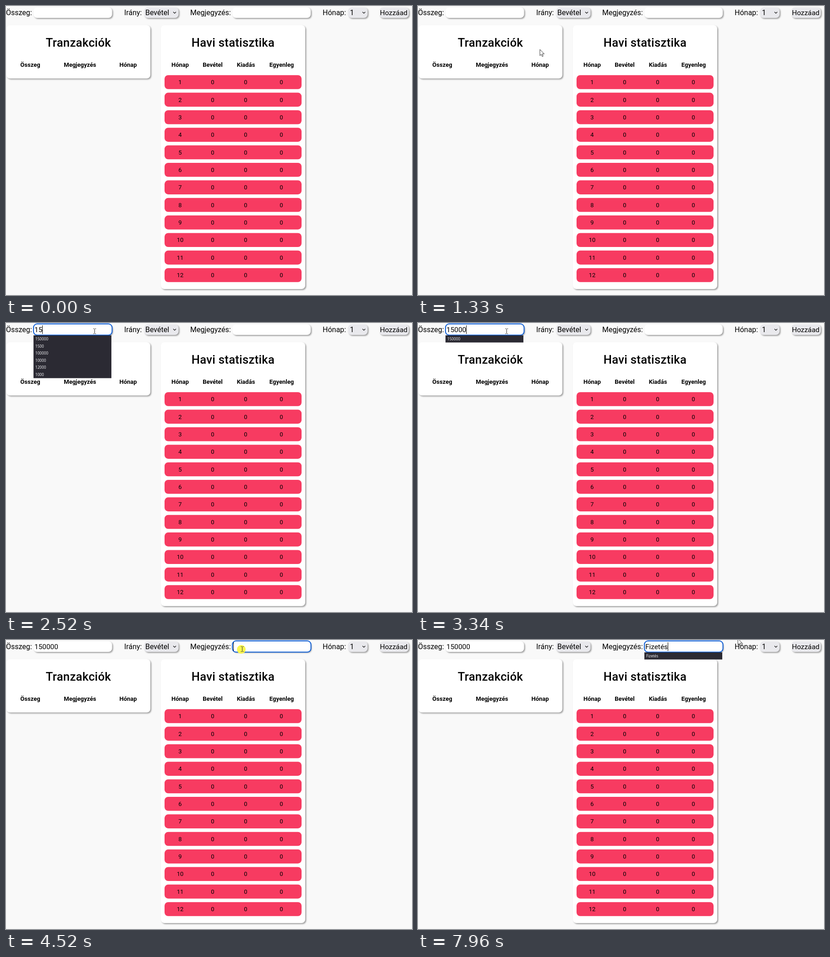
An HTML page that plays this animation: 886x632 px, repeating every 8 s.

```html
<!DOCTYPE html>
<html lang="hu">
<head>
<meta charset="utf-8">
<title>Tranzakciók</title>
<style>
  html, body { margin: 0; width: 100%; height: 100%; overflow: hidden; background: #f9f9f9; }
  svg { display: block; width: 886px; height: 632px; }
  text { font: 16px Roboto, sans-serif; white-space: pre; }
  .mid { text-anchor: middle; }
  .title { font-size: 25.6px; font-weight: 500; letter-spacing: .3px; }
  .head { font-size: 13px; font-weight: 700; }
  .cell { font-size: 13px; }
  .field { font-size: 15.36px; }
  .hint { font: 8.2px "Open Sans", sans-serif; fill: #fbfbfe; }
  .raised { filter: drop-shadow(2px 2px 1.5px #999); }
</style>
</head>
<body>
<svg id="stage" viewBox="0 0 886 632"></svg>
<script>
const LOOP = 8000, ROW = 15.6;
const stage = document.getElementById('stage');

function add(tag, attrs, text = '') {
  const el = document.createElementNS('http://www.w3.org/2000/svg', tag);
  for (const k in attrs) el.setAttribute(k, attrs[k]);
  el.textContent = text;
  stage.append(el);
  return el;
}
const box = (x, y, width, height, fill, cls = 'raised') =>
  add('rect', { x, y, width, height, rx: 8, fill, class: cls });
const label = (x, y, text, cls = '') => add('text', { x, y, class: cls }, text);
const show = (el, on) => el.style.display = on ? '' : 'none';

// Form bar
label(0, 20, 'Összeg:');
label(258, 20, 'Irány:');
label(402, 20, 'Megjegyzés:');
label(691, 20, 'Hónap:');
box(60, 3, 171.5, 23, '#fff');
box(494, 3, 171, 23, '#fff');
box(301.5, 3, 75, 23, '#e9e9ed');
box(746.5, 3, 42.5, 23, '#e9e9ed');
box(815, 3, 64, 23, '#e9e9ed');
label(304, 20, 'Bevétel');
label(750.5, 20, '1');
label(816, 20, 'Hozzáad', 'field');
for (const x of [365, 778])
  add('path', { d: `M${x} 13l3 3 3-3`, fill: 'none', stroke: '#111', 'stroke-width': 1.2 });

// Cards
box(1, 42, 314, 116.5, '#fff');
box(338, 42, 315, 577, '#fff');
label(158, 89, 'Tranzakciók', 'mid title');
label(495.5, 89, 'Havi statisztika', 'mid title');
[['Összeg', 53], ['Megjegyzés', 161.5], ['Hónap', 266.5],
 ['Hónap', 380], ['Bevétel', 451], ['Kiadás', 523.5], ['Egyenleg', 601.5]]
  .forEach(([s, x]) => label(x, 132.5, s, 'mid head'));
for (let i = 0; i < 12; i++) {
  const y = 151.2 + i * 38.36;
  box(346, y, 299, 30.6, '#f73b61', '');
  [380, 451, 523, 601].forEach((x, c) => label(x, y + 20, c ? '0' : i + 1, 'mid cell'));
}

// Text fields: key times with the letters present, and earlier entries to suggest
const fields = [
  { x: 60, from: 2030, to: 4520, word: '150000', keys: [2440, 2520, 2640, 3060, 3260, 3580],
    past: ['150000', '1500', '100000', '10000', '12000', '1000'] },
  { x: 494, from: 4520, to: LOOP, word: 'Fizetés', keys: [5890, 6090, 6300, 6420, 6630, 6840, 6960],
    past: ['Fizetés'] }
];
const caretOff = [[4110, 4520], [5060, 5550], [7170, 7710]];
for (const f of fields) {
  f.ring = add('rect', { x: f.x, y: 2, width: 171.5, height: 24.5, rx: 8,
    fill: '#fff', stroke: '#0b5cd5', 'stroke-width': 2 });
  f.text = label(f.x + 2, 20, '', 'field');
  f.caret = add('rect', { y: 5, width: 1, height: 19 });
  f.list = add('rect', { x: f.x, y: 27, width: 170, fill: '#2b2a33' });
  f.hints = f.past.map((s, i) => label(f.x + 4, 38 + i * ROW, '', 'hint'));
}

function drawField(f, t) {
  const typed = time => f.word.slice(0, f.keys.filter(k => k <= time).length);
  const focus = t >= f.from && t < f.to;
  f.text.textContent = typed(t);
  show(f.ring, focus);
  show(f.caret, focus && !caretOff.some(([a, b]) => t >= a && t < b));
  const width = f.text.textContent ? f.text.getComputedTextLength() : 0;
  f.caret.setAttribute('x', Math.round(f.x + 2 + width));

  const start = typed(t - 40);
  const found = focus && start ? f.past.filter(s => s.startsWith(start)) : [];
  f.list.setAttribute('height', found.length * ROW);
  f.hints.forEach((h, i) => h.textContent = found[i] || '');
}

// Pointer
const glow = add('circle', { r: 9.5, fill: '#fcf750' });
const arrow = add('path', { d: 'M0 0V13.5L3 10.7 5 15.5 7.2 14.6 5.2 9.8H9.5Z',
  fill: '#fff', stroke: '#222', 'stroke-width': .9 });
const beam = add('path', { d: 'M-3-5.5h2l1 1 1-1h2M0-4.5v9M-3 5.5h2l1-1 1 1h2',
  fill: 'none', stroke: '#333' });

const linear = p => p, easeOut = p => p * (2 - p), easeIn = p => p * p;
const smooth = p => p * p * (3 - 2 * p);
// start, end, from, to, easing
const moves = [
  [280, 850, [845, 625], [482, 316], linear],
  [850, 1050, [482, 316], [375, 213], linear],
  [1050, 1810, [375, 213], [194, 18], easeOut],
  [3360, 4230, [194, 18], [516, 20], smooth],
  [7680, 7960, [516, 20], [698, -3], easeIn]
];
const clicks = [[1980, 2110, 191.5, 17], [4520, 4730, 513.5, 20.5]];
const textZones = [[0, 232], [258, 297], [402, 491], [494, 665]];

function drawPointer(t) {
  const move = moves.filter(m => t >= m[0]).pop();
  let x = 900, y = 640;
  if (move) {
    const [a, b, p, q, ease] = move;
    const k = ease(Math.min(1, (t - a) / (b - a)));
    x = p[0] + (q[0] - p[0]) * k;
    y = p[1] + (q[1] - p[1]) * k;
  }
  const overText = y > 3 && y < 27 && textZones.some(([a, b]) => x >= a && x <= b);
  show(arrow, !overText);
  show(beam, overText);
  const spot = `translate(${Math.round(x) - (overText ? .5 : 0)} ${Math.round(y)})`;
  arrow.setAttribute('transform', spot);
  beam.setAttribute('transform', spot);

  const click = clicks.find(c => t >= c[0] && t < c[1]);
  show(glow, click);
  if (click) {
    glow.setAttribute('cx', click[2]);
    glow.setAttribute('cy', click[3]);
  }
}

function draw() {
  const t = performance.now() % LOOP;
  fields.forEach(f => drawField(f, t));
  drawPointer(t);
  requestAnimationFrame(draw);
}
draw();
</script>
</body>
</html>
```
